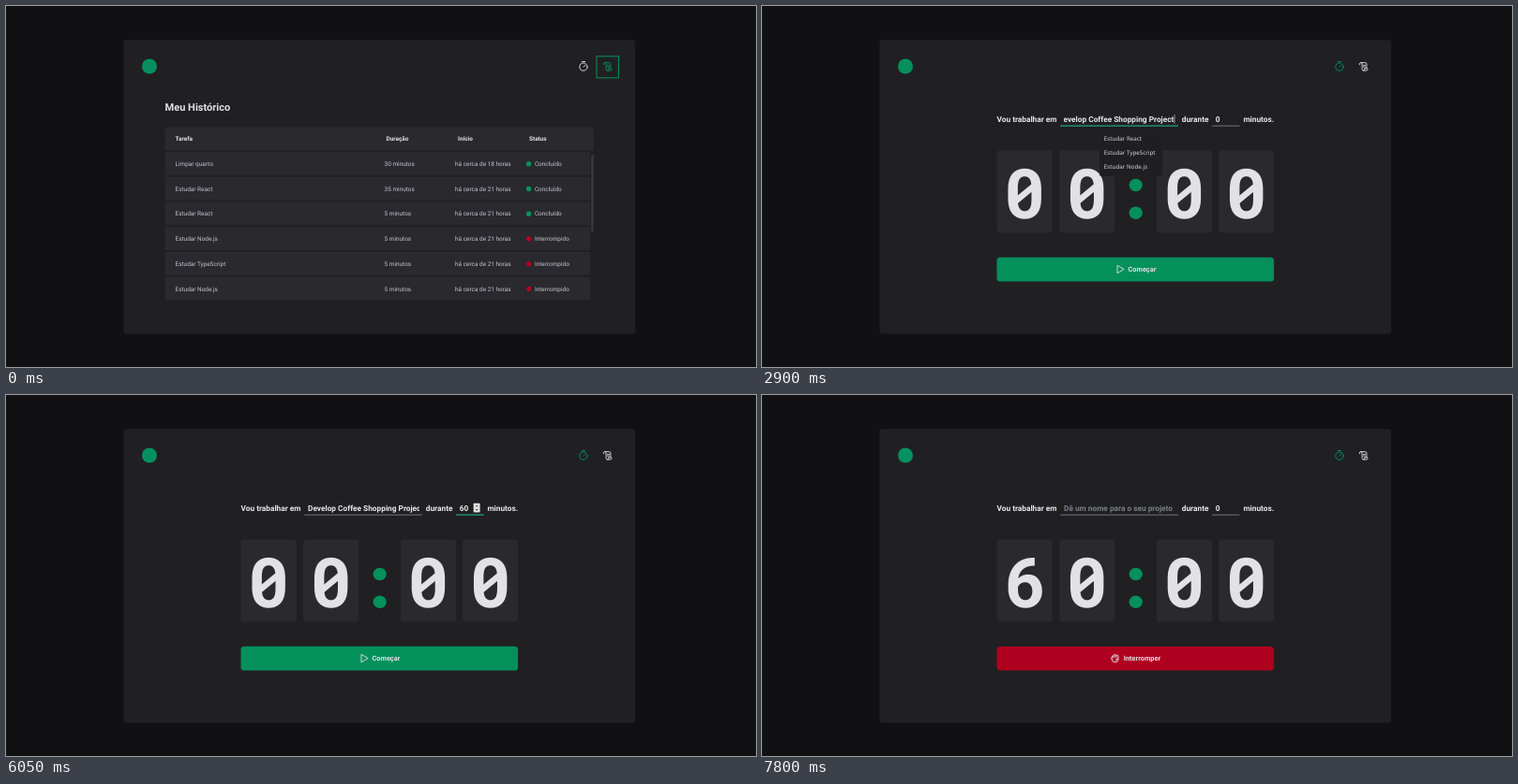
Animation, 800 px wide and 386 px high, one loop 8000 ms. Source, as an HTML page:

```html
<!DOCTYPE html>
<html lang="pt-BR">
<head>
<meta charset="utf-8">
<title>Timer</title>
<style>
  html, body { margin: 0; width: 100%; height: 100%; overflow: hidden; background: #111113; }
  svg { display: block; width: 100%; height: 100%; }
  text { font: 6.45px Roboto, sans-serif; fill: #c4c4cc; text-rendering: geometricPrecision; white-space: pre; }
  .head { font-weight: 700; fill: #e1e1e6; }
  .title { font-size: 11.06px; font-weight: 700; fill: #e1e1e6; }
  .field { font-size: 8.3px; font-weight: 700; fill: #e8e8ec; }
  .hint { fill: #7c7c8a; }
  .label { font-size: 7.38px; font-weight: 700; fill: #e1e1e6; }
  .digit { font-size: 73.8px; font-weight: 700; fill: #e1e1e6; text-anchor: middle; }
  .menu text { font: 6.25px "Noto Sans", sans-serif; fill: #d8d8da; }
  .tip text { font: 5.9px "Noto Sans", sans-serif; fill: #9b9b9e; }
  .icon { fill: none; stroke: #e1e1e6; stroke-width: .9; stroke-linecap: round; stroke-linejoin: round; }
  .on { stroke: #04935f; }
  .ring { fill: none; stroke: #04935f; stroke-width: 1; }
</style>
</head>
<body>
<svg viewBox="0 0 800 386" preserveAspectRatio="none">
  <defs>
    <clipPath id="nameClip"><rect x="322" y="112" width="118.3" height="18"/></clipPath>
    <g id="clock">
      <circle cx="616" cy="65.1" r="4.1"/>
      <path d="M614.4 59.5h3.2M616 65.1l2-2"/>
    </g>
    <g id="scroll">
      <path d="M637.6 62.9a1.4 1.4 0 1 1 2.5-.9v5.6a1.4 1.4 0 0 0 2.8 0q0-.5-.4-.9h3.2q.4.4.4.9a1.4 1.4 0 0 1-1.4 1.4h-3.2M638.7 60.6h4.8a1.4 1.4 0 0 1 1.4 1.4v4.6M641.5 63.3h2M641.5 65h2"/>
    </g>
  </defs>

  <rect width="800" height="386" fill="#111113"/>
  <rect x="125.3" y="36.2" width="546" height="314.3" rx="3.7" fill="#202023"/>
  <circle cx="153" cy="64.5" r="8" fill="#07905f"/>

  <g id="history">
    <use href="#clock" class="icon"/>
    <use href="#scroll" class="icon on"/>
    <rect class="ring" x="630" y="53.8" width="23.4" height="23"/>
    <text class="title" x="169.5" y="112">Meu Histórico</text>
    <path d="M169.5 154V133.2a3.7 3.7 0 0 1 3.7-3.7H623.3a3.7 3.7 0 0 1 3.7 3.7V154z" fill="#29292e"/>
    <g id="table"></g>
    <rect x="624.2" y="159" width="2.4" height="82.5" rx="1.2" fill="#39393f"/>
  </g>

  <g id="timer">
    <use href="#clock" class="icon on"/>
    <use href="#scroll" class="icon"/>
    <rect id="ring" class="ring" x="604.6" y="53.8" width="23.4" height="23"/>

    <text class="field" x="250.5" y="123.5">Vou trabalhar em</text>
    <text class="field" x="447.8" y="123.5">durante</text>
    <text class="field" x="513.4" y="123.5">minutos.</text>
    <path d="M318.3 128.2H444M480.2 128.2H509.4" stroke="#7c7c8a" stroke-width=".92"/>
    <path id="nameFocus" d="M318.3 128.2H444" stroke="#04a068" stroke-width="1"/>
    <path id="numFocus" d="M480.2 128.2H509.4" stroke="#04a068" stroke-width="1"/>
    <g clip-path="url(#nameClip)">
      <text id="hint" class="field hint" x="322" y="123.5">Dê um nome para o seu projeto</text>
      <text id="nameEnd" class="field" x="439.4" y="123.5" text-anchor="end">Develop Coffee Shopping Project</text>
      <text id="nameStart" class="field" x="322" y="123.5">Develop Coffee Shopping Project</text>
    </g>
    <text id="num0" class="field" x="483.8" y="123.5">0</text>
    <text id="num60" class="field" x="483.8" y="123.5">60</text>
    <g id="carets" fill="#e8e8ec">
      <rect id="caretHint" x="322" y="116" width=".6" height="9.6"/>
      <rect id="caretName" x="439.7" y="116" width=".6" height="9.6"/>
      <rect id="caret0" x="488.5" y="116" width=".6" height="9.6"/>
      <rect id="caret60" x="493" y="116" width=".6" height="9.6"/>
    </g>
    <g id="spinner">
      <rect x="498.7" y="115.8" width="6.9" height="9.6" rx=".7" fill="#efefef"/>
      <path d="M500.7 119.3l1.45-1.7 1.45 1.7zM500.7 122l1.45 1.7 1.45-1.7z" fill="#4a4a4a"/>
    </g>

    <g id="clockFace"></g>
    <g fill="#04905b">
      <ellipse cx="398.7" cy="191.5" rx="7.1" ry="6.7"/>
      <ellipse cx="398.7" cy="221.2" rx="7.1" ry="6.7"/>
    </g>

    <g id="start">
      <rect class="btn" x="250.5" y="268.8" width="295.6" height="25.8" rx="3.7" fill="#04905b"/>
      <rect id="startHover" x="250.5" y="268.8" width="295.6" height="25.8" rx="3.7" fill="#045f42"/>
      <path class="icon" d="M379 277.7v8l6.8-4z"/>
      <text class="label" x="390.5" y="284.4">Começar</text>
    </g>
    <g id="stop">
      <rect x="250.5" y="269" width="295.6" height="25.4" rx="3.7" fill="#b00020"/>
      <rect id="stopHover" x="250.8" y="269.4" width="295" height="24.8" rx="3.4" fill="#7d001a" stroke="#a0001f" stroke-width=".7"/>
      <path class="icon" stroke-width=".8" d="M373.2 282.3l-.5-1.6q-.1-1 1-1l.8 1.2v-2.5q.7-1.6 1.8-.2.6-1.5 1.8.1 1.6-.8 1.9.6v3.6a3.4 3.4 0 0 1-6.8-.2zM376.3 278.3v2.2M378.1 278.5v2.2M377 284.2q0-2.1 3-2.1"/>
      <text class="label" x="385.8" y="284.4">Interromper</text>
    </g>

    <g id="menu" class="menu">
      <rect x="360" y="132.5" width="67" height="49.5" rx="2" fill="#1f1f22"/>
      <text x="364.8" y="144.1">Estudar React</text>
      <text x="364.8" y="159.2">Estudar TypeScript</text>
      <text x="364.8" y="174.3">Estudar Node.js</text>
    </g>
  </g>

  <rect id="hover" x="605.1" y="74.9" width="22.4" height="1.5" fill="#04935f"/>
  <g id="tip" class="tip">
    <rect x="-2" y="378.6" width="42.5" height="9" rx="1" fill="#37373a"/>
    <text x="-1.8" y="384.6">localhost:5173</text>
  </g>
</svg>
<script>
const LOOP = 8000;
const byId = id => document.getElementById(id);
const label = (x, y, text, cls = '') => `<text x="${x}" y="${y}" class="${cls}">${text}</text>`;

const heads = [[180.5, 'Tarefa'], [405.5, 'Duração'], [482, 'Início'], [558, 'Status']];
const tasks = [
  ['Limpar quarto', 30, 18, true],
  ['Estudar React', 35, 21, true],
  ['Estudar React', 5, 21, true],
  ['Estudar Node.js', 5, 21, false],
  ['Estudar TypeScript', 5, 21, false],
  ['Estudar Node.js', 5, 21, false]
];
const row = ([name, minutes, hours, done], i) => {
  const top = 156 + i * 26.75, base = top + 14.8;
  return `<rect x="169.5" y="${top}" width="453.8" height="24.9" fill="#29292e"/>` +
    label(180.5, base, name) +
    label(403.6, base, `${minutes} minutos`) +
    label(479, base, `há cerca de ${hours} horas`) +
    `<circle cx="557.6" cy="${top + 12.8}" r="2.7" fill="${done ? '#04935f' : '#b50022'}"/>` +
    label(563.9, base, done ? 'Concluído' : 'Interrompido');
};
byId('table').innerHTML =
  heads.map(([x, text]) => label(x, 144.1, text, 'head')).join('') + tasks.map(row).join('');

const zero = x => label(x, 227.2, '0', 'digit') +
  `<path d="M${x - 10} 209l20 -16.5" stroke="#e1e1e6" stroke-width="6.6"/>`;
byId('clockFace').innerHTML = [280.1, 346.6, 450.4, 516.7].map((x, i) =>
  `<rect x="${x - 29.6}" y="154.2" width="59.2" height="88.4" rx="3.7" fill="#29292e"/>` +
  (i ? zero(x) : `<g id="tens0">${zero(x)}</g><g id="tens6">${label(x, 227.2, '6', 'digit')}</g>`)
).join('');

// Opacity of each part as [time, value] steps; every part starts from its first entry.
const tracks = {
  history: [[0, 1], [850, 0]],
  timer: [[0, 0], [850, 1]],
  hover: [[0, 0], [500, 1], [1350, 0]],
  ring: [[0, 1], [1650, 0]],
  tip: [[0, 0], [900, .3], [950, .65], [1000, 1], [1650, .75], [1700, .5], [1750, .25], [1800, 0]],
  nameFocus: [[0, 0], [1650, 1], [4100, 0]],
  numFocus: [[0, 0], [4100, 1], [7000, 0]],
  hint: [[0, 1], [2900, 0], [7000, 1]],
  nameEnd: [[0, 0], [2900, 1], [4100, 0]],
  nameStart: [[0, 0], [4100, 1], [7000, 0]],
  num0: [[0, 1], [4950, 0], [7000, 1]],
  num60: [[0, 0], [4950, 1], [7000, 0]],
  caretHint: [[0, 0], [1800, 1], [2350, 0]],
  caretName: [[0, 0], [2900, 1], [3450, 0]],
  caret0: [[0, 0], [4150, 1], [4750, 0]],
  caret60: [[0, 0], [5450, 1], [6050, 0], [6700, 1], [7000, 0]],
  spinner: [[0, 0], [3500, .35], [3550, .7], [3650, 1], [6050, .94], [7000, 0]],
  menu: [[0, 0], [1700, .35], [1750, .7], [1800, 1], [2950, .75], [3000, .5], [3050, .25], [3100, 0]],
  tens0: [[0, 1], [7000, 0]],
  tens6: [[0, 0], [7000, 1]],
  start: [[0, .7], [2900, 1], [7000, 0]],
  startHover: [[0, 0], [6700, 1]],
  stop: [[0, 0], [7000, 1]],
  stopHover: [[0, 1], [7800, 0]]
};

for (const [id, steps] of Object.entries(tracks)) {
  const frames = steps.map(([time, opacity]) => ({ offset: time / LOOP, opacity, easing: 'steps(1, end)' }));
  frames.push({ offset: 1, opacity: steps.at(-1)[1] });
  byId(id).animate(frames, { duration: LOOP, iterations: Infinity });
}
</script>
</body>
</html>
```
